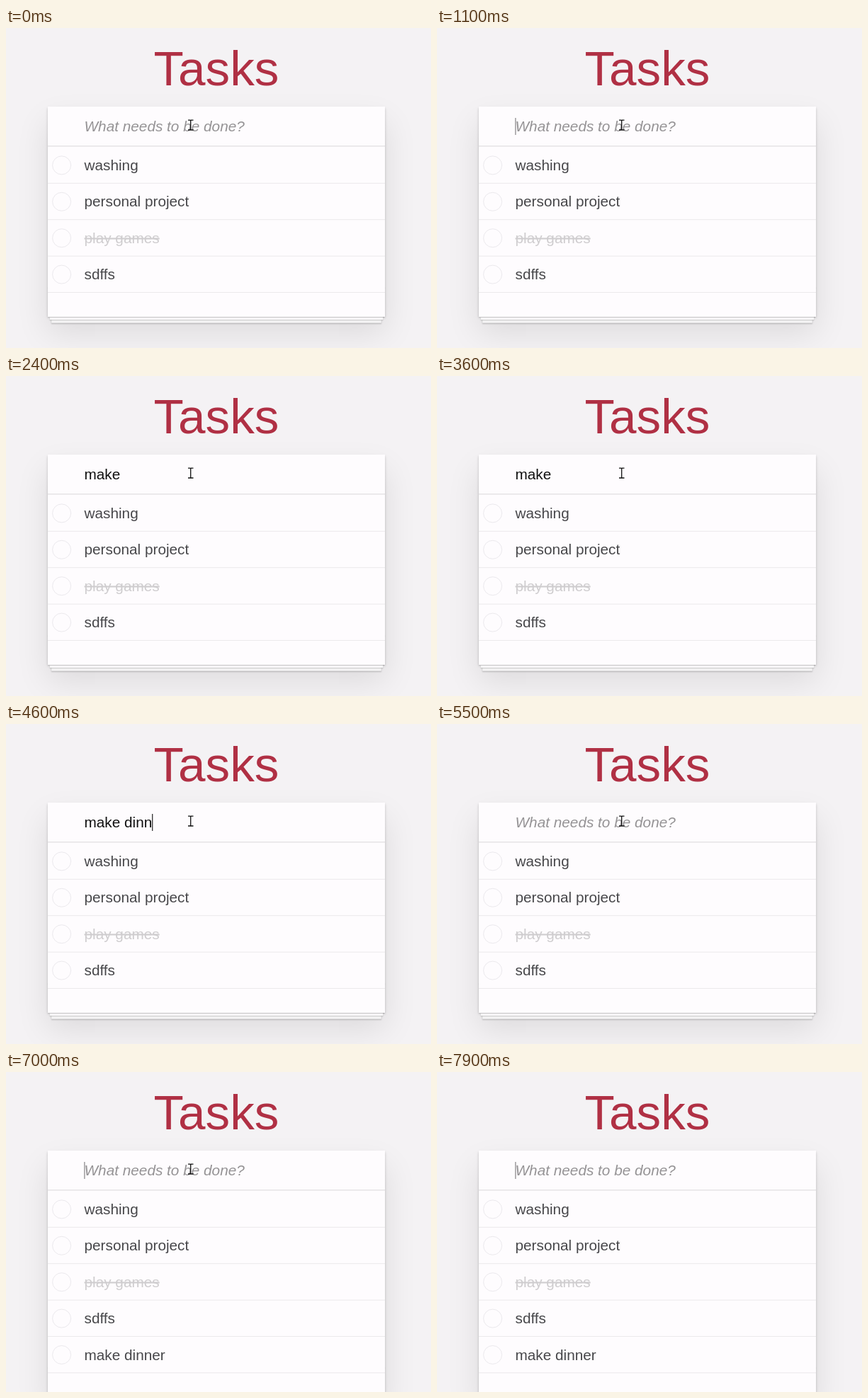
These frames come from a looping animation (600 px wide and 452 px high, 8000 ms). An HTML page:

```html
<!DOCTYPE html>
<html lang="en">
<head>
<meta charset="utf-8">
<title>Tasks</title>
<style>
  html, body { margin: 0; width: 100%; height: 100%; overflow: hidden; background: #f4f2f4; }
  .card, .stack { position: absolute; left: 58.9px; width: 476px; background: #fefcfe; }
  .card {
    top: 110.6px;
    box-shadow: 0 1.7px 3.5px rgba(0,0,0,.2), 0 21.6px 43.3px rgba(0,0,0,.1);
  }
  .stack {
    bottom: 0; left: 0; height: 43px;
    box-shadow: 0 .9px .9px rgba(0,0,0,.2),
      0 6.9px 0 -2.6px #f6f5f6, 0 7.8px .9px -2.6px rgba(0,0,0,.2),
      0 13.8px 0 -5.2px #f6f5f6, 0 14.7px 1.7px -5.2px rgba(0,0,0,.2);
  }
  svg { position: absolute; left: 0; top: 0; }
  text { font: 20.77px "Liberation Sans", Arial, sans-serif; fill: #47474a; white-space: pre; }
  .title { font-size: 69.24px; fill: #b03044; text-anchor: middle; }
  .hint { font-style: italic; fill: #959395; }
  #typed { fill: #111; }
  .done text { fill: #cfcdcf; text-decoration: line-through; }
  .row path { stroke: #ebe9eb; }
  circle { fill: none; stroke: #ebe9ed; }
</style>
</head>
<body>
<div class="card" id="card"><div class="stack"></div></div>
<svg width="600" height="452">
  <text class="title" x="297" y="80.5">Tasks</text>
  <path d="M59 166.8H535" stroke="#e6e4e6" stroke-width="1.6"/>
  <g id="rows"></g>
  <text class="hint" id="hint" x="110.5" y="146">What needs to be done?</text>
  <text id="typed" x="110.5" y="146"></text>
  <rect id="caret" y="127" width="1.2" height="24"/>
  <path id="mouse" fill="none" stroke="#111" stroke-width="1.3"
    d="M257 130.2H260L260.7 131L261.4 130.2H264.5M260.7 131V143.2M257 144H260L260.7 143.2L261.4 144H264.5"/>
</svg>
<script>
const LOOP = 8000, LEFT = 110.5, PITCH = 51.4, ADDED = 5900, MOUSE_GONE = 7400;
const $ = id => document.getElementById(id);

// [start time, value] pairs; each value holds until the next one
const typing = [[0, ""], [1400, "m"], [2300, "make "], [4400, "make d"], [4500, "make din"],
  [4600, "make dinn"], [4700, "make dinner"], [5500, ""]];
const blink = [[0, 0], [100, 1], [2400, 0], [3400, 1], [3600, 0], [4400, 1], [5500, 0],
  [5900, 1], [6300, 0], [6400, 1], [7400, 0], [7900, 1]];
const valueAt = (steps, t) => steps.findLast(s => s[0] <= t)[1];

const tasks = ["washing", "personal project", "play games", "sdffs", "make dinner"];
$("rows").innerHTML = tasks.map((name, i) => `
  <g class="row ${i === 2 ? "done" : ""}" transform="translate(0 ${i * PITCH})">
    <circle cx="78.6" cy="193.9" r="13"/>
    <text x="${LEFT}" y="201">${name}</text>
    <path d="M59 219.3H535"/>
  </g>`).join("");
const newRow = $("rows").lastElementChild;

const show = (el, on) => el.setAttribute("visibility", on ? "visible" : "hidden");

function draw(now) {
  const t = now % LOOP;
  const text = valueAt(typing, t);
  const added = t >= ADDED;
  $("typed").textContent = text;
  show($("hint"), !text);
  $("caret").setAttribute("x", LEFT - .2 + (text ? $("typed").getComputedTextLength() : 0));
  $("caret").setAttribute("fill", text ? "#222" : "#858385");
  show($("caret"), valueAt(blink, t));
  show(newRow, added);
  $("card").style.height = 297.4 + (added ? PITCH : 0) + "px";
  show($("mouse"), t < MOUSE_GONE);
  requestAnimationFrame(loop);
}

const start = performance.now();
function loop() { draw(performance.now() - start); }
loop();
</script>
</body>
</html>
```
